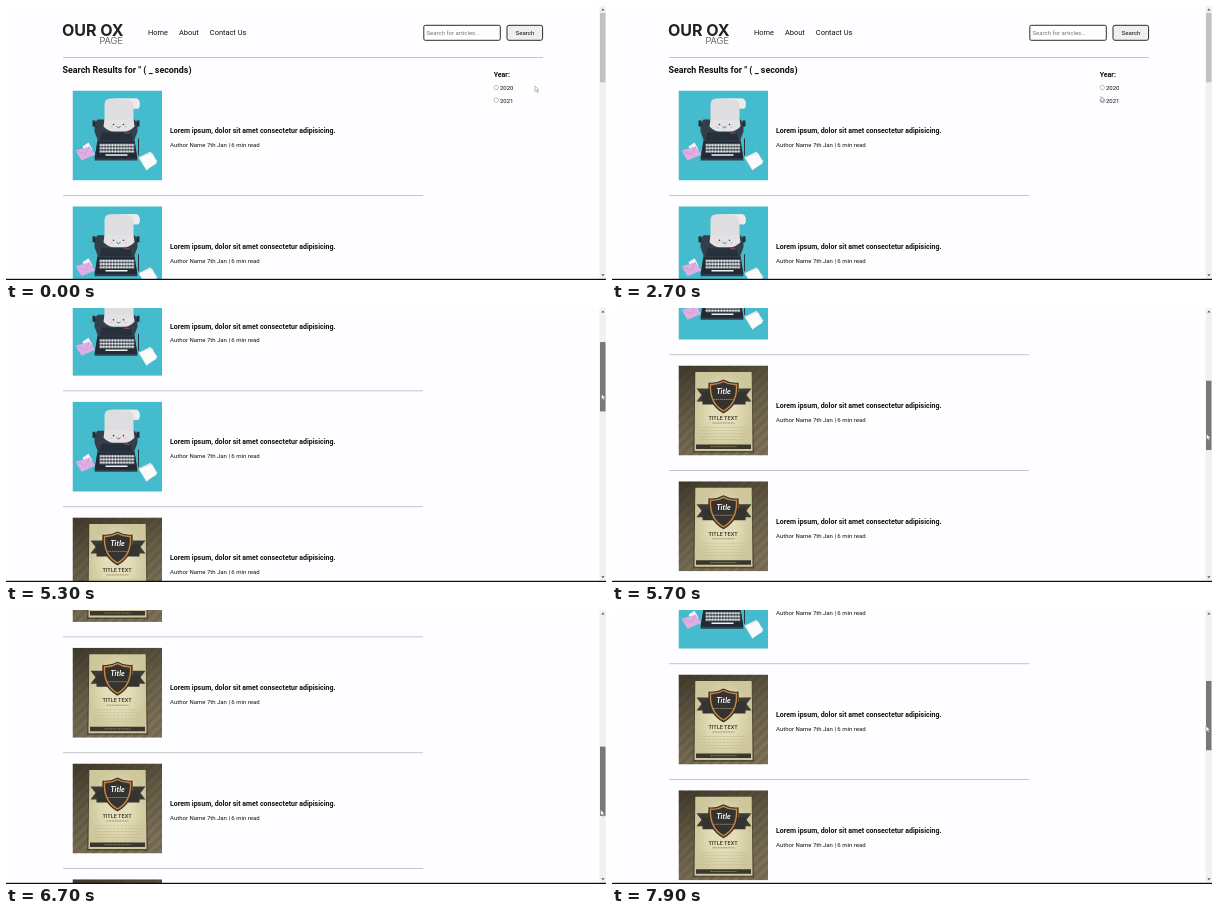
Write an HTML page that moves like this. It is 600 px wide and 274 px high and loops after 8 s.

```html
<!DOCTYPE html>
<html lang="en">
<head>
<meta charset="utf-8">
<title>Search results</title>
<style>
  html, body { margin: 0; width: 100%; height: 100%; overflow: hidden; background: #fefdff; }
  svg { display: block; width: 600px; height: 274px; }
  text { font-family: Roboto, sans-serif; font-size: 6px; fill: #111; white-space: pre; }
  .nav { font-size: 7.45px; }
  .logo { font: 700 16px Inter, sans-serif; fill: #222; }
  .sub { font: 300 9.3px Inter, sans-serif; fill: #444; text-anchor: end; }
  .head { font-size: 8.9px; font-weight: 700; }
  .title { font-size: 7px; font-weight: 700; }
  .hint { fill: #757575; }
  .foot { font: 6.25px "Liberation Serif", serif; fill: #fff; text-anchor: middle; }
  .rule { stroke: #c6c5c8; }
  .radio { fill: #fff; stroke: #999; stroke-width: .6; }
  .dot { fill: none; }
  .on .radio { stroke: #4a90e2; stroke-width: .7; }
  .on .dot { fill: #1374e6; }
</style>
</head>
<body>
<svg viewBox="0 0 600 274">
  <defs>
    <clipPath id="box"><rect width="89.6" height="90"/></clipPath>
    <linearGradient id="wood" x1="0" y1="0" x2=".35" y2="1">
      <stop offset="0" stop-color="#3f392b"/>
      <stop offset=".55" stop-color="#685e47"/>
      <stop offset="1" stop-color="#7d7157"/>
    </linearGradient>
    <radialGradient id="cream">
      <stop offset=".4" stop-color="#e4deb8"/>
      <stop offset="1" stop-color="#cfc79c"/>
    </radialGradient>
    <pattern id="stripes" width="7" height="7" patternUnits="userSpaceOnUse" patternTransform="rotate(45)">
      <rect width="3.5" height="7" fill="#2f291d" opacity=".16"/>
    </pattern>
    <pattern id="keys" x="27" y="53" width="2.9" height="3.2" patternUnits="userSpaceOnUse">
      <rect x=".3" y=".4" width="2.2" height="2.3" rx=".6" fill="#f0f2f4"/>
    </pattern>

    <g id="writer" clip-path="url(#box)">
      <rect width="89.6" height="90" fill="#45bccd"/>
      <path d="M10 56l6-4 4 7-7 4z" fill="#f6f2f6"/>
      <path d="M3 60l14-4 6 8-14 6z" fill="#dfaee2"/>
      <path d="M3 60l10 4 4-8" fill="none" stroke="#c38bc8" stroke-width=".5"/>
      <path d="M66 67l12-6 7 10-11 9z" fill="#e8e9ec"/>
      <path d="M67 67l13-4 4 10-10 6z" fill="#fbfbfc"/>
      <path d="M66 48v17" stroke="#2b353e" stroke-width="1"/>
      <path d="M25 29h37l3 4v8l-3 8 3 21H22l3-21-3-8v-8z" fill="#343f4c"/>
      <path d="M20 30h3v6h-3zM64 30h3v6h-3z" fill="#252e38"/>
      <path d="M32 31V14q0-6 6-6h26q4 1 3 8l-1 2h-5v13z" fill="#dedee0"/>
      <path d="M38 8h26q4 1 3 8l-1 2h-5q1-8-5-9z" fill="#ececee"/>
      <path d="M32 29h29l1 7q-5 5-10 5H41q-5 0-10-5z" fill="#e3e3e5"/>
      <g fill="#333c46"><circle cx="41" cy="34" r=".8"/><circle cx="51" cy="34" r=".8"/></g>
      <path d="M44 36q2 2.500 4 0" fill="none" stroke="#333c46" stroke-width=".7"/>
      <path d="M38 36.500h2M52 36.500h2" stroke="#eba5a8" stroke-width=".9"/>
      <path d="M29 42h29l2 8H27z" fill="#26303a"/>
      <path d="M52 42.500h5" stroke="#b84d4f" stroke-width=".9"/>
      <path d="M25 51h37l3 17H22z" fill="#222b35"/>
      <path d="M27 53h34.800v9.600H27z" fill="url(#keys)"/>
      <path d="M33 64.500h22" stroke="#f0f2f4" stroke-width="1.500"/>
    </g>

    <g id="poster" clip-path="url(#box)">
      <rect width="89.6" height="90" fill="url(#wood)"/>
      <rect width="89.6" height="90" fill="url(#stripes)"/>
      <path d="M14.500 87l2-80h57l2 80z" fill="#2d281d" opacity=".5"/>
      <path d="M16 85.500l.8-79h56.400l.8 79z" fill="url(#cream)"/>
      <path d="M18 23h13v13H18l5-6.500zM73 23H60v13h13l-5-6.500z" fill="#3d3b36"/>
      <path d="M24 27h43v12H24z" fill="#35332f"/>
      <path d="M45 14q7 4 15 3 2 22-15 31-17-9-15-31 8 1 15-3z" fill="#35332f"/>
      <path d="M45 16q6 3.500 13 3 1 19-13 26.500Q31 38 32 19q7 .5 13-3z" fill="none" stroke="#c98742" stroke-width="1.400"/>
      <path d="M35 34h20" stroke="#a9a48b" stroke-width=".7" stroke-dasharray="1.500 .6"/>
      <text x="45" y="28.500" text-anchor="middle" style="font:italic 700 7.500px Lato,sans-serif;fill:#fff">Title</text>
      <text x="44.500" y="54.500" text-anchor="middle" style="font-size:5.600px;font-weight:500;fill:#3a372f">TITLE TEXT</text>
      <path d="M34 57.500h22" stroke="#777052" stroke-width=".7" stroke-dasharray="2 .6"/>
      <path d="M22 62h46M22 65h46M22 68h46M22 71h46M22 74h46" stroke="#c0b990" stroke-width=".6" stroke-dasharray="3 .7"/>
      <path d="M17.500 79h55v4.500h-55z" fill="#39362f"/>
      <path d="M32 81.200h26" stroke="#a99b6a" stroke-width=".7" stroke-dasharray="2 .7"/>
    </g>
  </defs>

  <rect width="600" height="274" fill="#fefdff"/>
  <g id="page">
    <text class="logo" x="56" y="29.500">OUR OX</text>
    <text class="sub" x="117" y="38">PAGE</text>
    <text class="nav" x="142" y="29.400">Home</text>
    <text class="nav" x="173" y="29.400">About</text>
    <text class="nav" x="203.800" y="29.400">Contact Us</text>
    <rect x="417.800" y="19.300" width="76.500" height="15" rx="1.500" fill="#fff" stroke="#2b2b2b"/>
    <text class="hint" x="420.500" y="28.800">Search for articles...</text>
    <rect x="501" y="19.300" width="35.600" height="15" rx="2" fill="#efefef" stroke="#2b2b2b"/>
    <text x="509.500" y="28.800" style="font-size:6.200px">Search</text>
    <path class="rule" d="M57 51.500h480"/>
    <text class="head" x="56.500" y="67">Search Results for " ( _ seconds)</text>
    <text class="title" x="487.700" y="70.800">Year:</text>
    <g id="y2020"></g>
    <g id="y2021"></g>
    <g id="list"></g>
    <rect x="0" y="1000.600" width="594" height="30" fill="#981a2b"/>
    <text class="foot" x="297" y="1009.600">Copyright © OurOxPage.com</text>
    <text class="foot" x="297" y="1016.800" text-decoration="underline">Vector Credits: Tindoval</text>
  </g>
  <rect x="593.500" width="6.500" height="274" fill="#f1f1f1"/>
  <path d="M595.300 4.500l1.600-2 1.600 2zM595.300 268.300l1.600 2 1.600-2z" fill="#555"/>
  <rect id="thumb" x="594" width="5.500" height="69.300"/>
  <rect y="272.800" width="600" height="1.200" fill="#0b0b0b"/>
  <path id="cursor" d="M0 0v5.600l1.300-1.200.9 2.100 1-.4-.9-2.100h1.700z" fill="#fff" stroke="#777" stroke-width=".5"/>
</svg>
<script>
const LOOP = 8000, STEP = 100, MAX = 747.6, ITEMS = 8, PITCH = 115.8;
const $ = id => document.getElementById(id);

const item = i => `<g transform="translate(0 ${85 + i * PITCH})">
  <use href="#${i < 2 ? 'writer' : 'poster'}" x="66.5" y="-.5"/>
  <text class="title" x="164" y="42.2">Lorem ipsum, dolor sit amet consectetur adipisicing.</text>
  <text x="164" y="55.8">Author Name 7th Jan | 6 min read</text>
  ${i < ITEMS - 1 ? '<path class="rule" d="M57 104.500h360"/>' : ''}</g>`;
$('list').innerHTML = Array.from({ length: ITEMS }, (_, i) => item(i)).join('');

const option = (year, y) => {
  $('y' + year).innerHTML = `<circle class="radio" cx="490.300" cy="${y}" r="2.200"/>
    <circle class="dot" cx="490.300" cy="${y}" r="1.300"/>
    <text x="494" y="${y + 2.4}">${year}</text>`;
};
option(2020, 81.6);
option(2021, 94.2);

// [time, scroll]
const scroll = [[5000, 0], [5100, 20], [5400, 150], [5700, 258.6], [6000, 292], [6300, 318.6],
  [6600, 450], [7000, 690], [7200, MAX], [7500, MAX], [7700, 540], [7900, 251.6]];
// [time, x, y]
const pointer = [[0, 529, 80], [800, 514, 87], [1000, 513, 87], [1800, 490, 80], [2100, 489, 80],
  [2400, 489, 90.5], [2700, 489, 90.5], [3000, 490, 80], [3200, 490, 80], [3500, 523, 70],
  [3800, 596, 45], [4100, 596, 30], [4400, 604, 40], [4700, 604, 60], [4900, 596, 62],
  [5100, 596, 66], [5700, 594.5, 126], [6300, 591.5, 139.5], [7000, 597, 245], [7200, 597, 265],
  [7500, 597, 265], [7900, 594, 116]];

function at(track, t, k = 1) {
  const n = track.findIndex(p => p[0] > t);
  if (n === 0) return track[0][k];
  if (n < 0) return track[track.length - 1][k];
  const a = track[n - 1], b = track[n];
  return a[k] + (b[k] - a[k]) * (t - a[0]) / (b[0] - a[0]);
}

// Values that hold until the next entry
const picked = [[0, 0], [1900, 2020], [2400, 0], [2700, 2021], [3100, 2020]];
const thumbFill = [[0, '#c1c1c1'], [3800, '#a8a8a8'], [4900, '#787878']];
const held = (track, t) => track.filter(p => p[0] <= t).pop()[1];

function draw(now) {
  const t = Math.floor(now % LOOP / STEP) * STEP;
  const s = at(scroll, t), year = held(picked, t);
  $('page').setAttribute('transform', `translate(0 ${-s})`);
  $('thumb').setAttribute('y', 7 + 190 * s / MAX);
  $('thumb').setAttribute('fill', held(thumbFill, t));
  $('cursor').setAttribute('transform', `translate(${at(pointer, t)} ${at(pointer, t, 2)})`);
  for (const y of [2020, 2021]) $('y' + y).setAttribute('class', y === year ? 'on' : '');
}

const start = performance.now();
function tick() {
  draw(performance.now() - start);
  requestAnimationFrame(tick);
}
tick();
</script>
</body>
</html>
```
